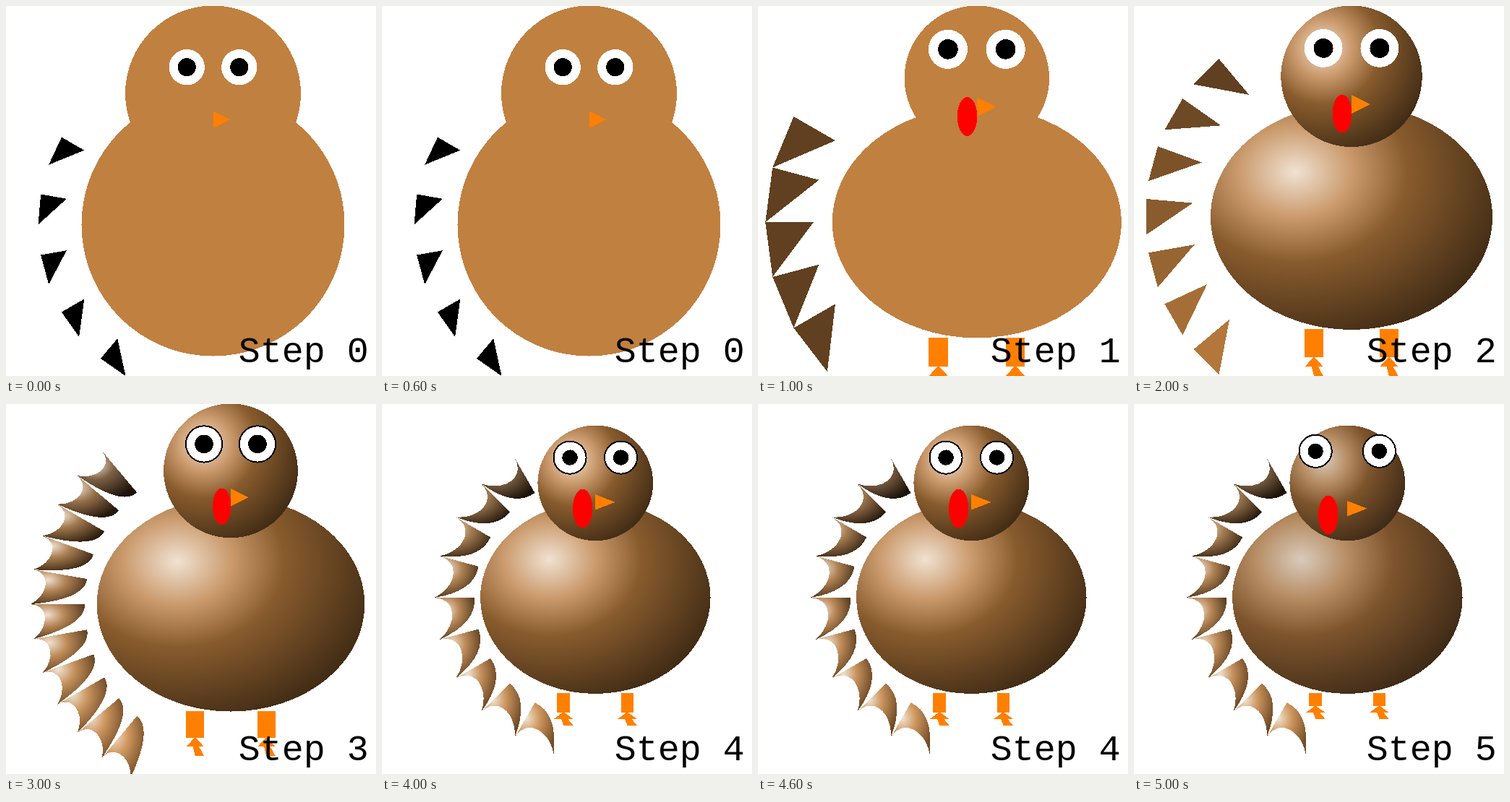
Write an HTML page that moves like this. It is 512x512 px and loops after 6000 ms.

```html
<!DOCTYPE html>
<html lang="en">
<head>
<meta charset="utf-8">
<title>Drawing a turkey step by step</title>
<style>
  html, body { margin: 0; width: 100%; height: 100%; overflow: hidden; background: #fff; }
  svg { display: block; width: 100%; height: 100%; }
  text { font: 50px "Liberation Mono", monospace; }
</style>
</head>
<body>
<svg id="stage" viewBox="0 0 512 512" shape-rendering="crispEdges"></svg>
<script>
const STEP_MS = 1000;
const TAN = [192, 128, 64];
const LIGHT = [240, 226, 210];
const ORANGE = '#ff8000';

// Proportions are in units; each step sets its unit size in pixels. Angles are in degrees.
const chick = {
  top: 0, head: 10, bodyY: 25, bodyRx: 15, bodyRy: 15,
  gap: 3, eyeY: 7, eye: 2, pupil: 1, beakY: 13, beakW: 2, beakHalf: 1,
  outer: 20, inner: 17, from: 30, to: -50, turn: 20, spread: 10, featherFill: () => [0, 0, 0]
};
const turkey = {
  ...chick, head: 7.5, bodyY: 22.5, bodyRy: 12, eyeY: 4.5, beakY: 10.5,
  wattle: 1, wattleX: -1, stance: 4, legH: 3, foot: 1,
  outer: 22, to: -30, turn: 15, spread: 15, featherFill: () => scale(TAN, 0.5)
};
const shinyTurkey = {
  ...turkey, shiny: true, dull: 0, from: 50, to: -40, spread: 10,
  featherFill: t => scale(TAN, 0.5 + 0.43 * t)
};
const curvedTurkey = {
  ...shinyTurkey, outlined: true, outer: 22.5, inner: 16.4, to: -50, turn: 10, featherFill: null
};
// Shift moves the face apart and shortens the legs, one unit each.
const plumpTurkey = shift => ({
  ...curvedTurkey, unit: 8.82, cx: 295.3, top: 30, dull: 0.12 * shift,
  head: 9, bodyY: 27, bodyRx: 18, bodyRy: 15,
  gap: 4 + shift, eyeY: 5 - shift, eye: 2.5, pupil: 1.15,
  beakY: 12 + shift, beakW: 3.1, beakHalf: 1.2,
  wattle: 1.5, wattleX: -2 - shift, stance: 5, legH: 3 - shift, foot: 1.5,
  outer: 25.3, inner: 19, from: 60, to: -60, turn: 15, spread: 15
});
const scenes = [
  { ...chick, unit: 12.1, cx: 286.5 },
  { ...turkey, unit: 13.3, cx: 302.8 },
  { ...shinyTurkey, unit: 12.97, cx: 301 },
  { ...curvedTurkey, unit: 12.32, cx: 311 },
  plumpTurkey(0),
  plumpTurkey(1)
];

const scale = (color, k) => color.map(v => v * k);
const mix = (a, b, t) => a.map((v, i) => v + (b[i] - v) * t);
const rgb = color => `rgb(${color.map(Math.round)})`;
const path = (d, fill) => `<path d="${d}" fill="${fill}"/>`;

function gradient(id, stops) {
  const marks = stops.map(([at, color]) => `<stop offset="${at}" stop-color="${rgb(color)}"/>`);
  return `<radialGradient id="${id}" cx=".3" cy=".3" r=".8">${marks.join('')}</radialGradient>`;
}

function skinGradient(dull) {
  const dim = color => mix(color, [40, 35, 30], dull);
  return gradient('skin', [
    [0, dim(LIGHT)], [0.25, dim([203, 155, 110])], [0.5, dim(scale(TAN, 0.71))], [1, dim(scale(TAN, 0.32))]
  ]);
}

// Feathers brighten from the top of the fan (t = 0) to the bottom (t = 1).
function featherGradient(id, t) {
  const middle = mix(scale(TAN, 0.5 + 0.55 * Math.sqrt(t)), LIGHT, 0.2);
  return gradient(id, [[0, LIGHT], [0.4, middle], [1, scale(TAN, 0.15 + 0.45 * t)]]);
}

function draw(s, step) {
  const px = v => v * s.unit;
  const X = v => s.cx + px(v);
  const Y = v => s.top + px(v);
  const skin = s.shiny ? 'url(#skin)' : rgb(TAN);
  const ellipse = (x, y, rx, ry, fill, extra = '') =>
    `<ellipse cx="${X(x)}" cy="${Y(y)}" rx="${px(rx) + 0.5}" ry="${px(ry) + 0.5}" fill="${fill}" ${extra}/>`;
  const polygon = (points, fill) => path('M' + points.map(([x, y]) => `${X(x)} ${Y(y)}`).join('L') + 'Z', fill);

  function feather(angle) {
    const at = (r, part) => {
      const a = (angle - s.spread * part) * Math.PI / 180;
      return `${X(-r * Math.cos(a))} ${Y(s.bodyY - r * Math.sin(a))} `;
    };
    const t = (s.from - angle) / (s.from - s.to);
    const start = `M${at(s.outer, 0)}L${at(s.inner, 0)}`;
    if (s.featherFill) return path(`${start}L${at(s.outer, 1)}Z`, rgb(s.featherFill(t)));
    const notch = s.outer * (1 - s.spread * Math.PI / 180 * 0.52);
    const vane = `${start}Q${at(s.inner, 0.8)}${at(s.outer, 1)}C${at(notch, 0.7)}${at(notch, 0)}${at(s.outer, 0)}Z`;
    return featherGradient('feather' + angle, t) + path(vane, `url(#feather${angle})`);
  }

  function leg(x) {
    const y = s.bodyY + s.bodyRy, ankle = y + s.legH, f = s.foot;
    return polygon([[x - 1, y], [x + 1, y], [x + 1, ankle], [x - 1, ankle]], ORANGE) +
      polygon([[x, ankle - 0.1], [x + f, ankle + 1], [x + 0.45 * f, ankle + 1], [x + f, ankle + 2],
        [x, ankle + 2], [x - 0.25 * f, ankle + 1], [x - f, ankle + 1]], ORANGE);
  }

  function eye(x) {
    const outline = s.outlined ? 'stroke="#000" stroke-width="2"' : '';
    return ellipse(x, s.eyeY, s.eye, s.eye, '#fff', outline) + ellipse(x, s.eyeY, s.pupil, s.pupil, '#000');
  }

  let out = s.shiny ? skinGradient(s.dull) : '';
  for (let angle = s.from; angle >= s.to; angle -= s.turn) out += feather(angle);
  if (s.legH) out += leg(-s.stance) + leg(s.stance);
  out += ellipse(0, s.bodyY, s.bodyRx, s.bodyRy, skin) + ellipse(0, s.head, s.head, s.head, skin);
  out += eye(-s.gap) + eye(s.gap);
  out += polygon([[0, s.beakY - s.beakHalf], [s.beakW, s.beakY], [0, s.beakY + s.beakHalf]], ORANGE);
  if (s.wattle) out += ellipse(s.wattleX, s.beakY + 1, s.wattle, 2 * s.wattle, '#f00');
  return out + `<text x="321.8" y="493">Step ${step}</text>`;
}

const stage = document.getElementById('stage');
let shown = -1;
function tick() {
  const step = Math.floor(performance.now() / STEP_MS) % scenes.length;
  if (step !== shown) {
    stage.innerHTML = draw(scenes[step], step);
    shown = step;
  }
  requestAnimationFrame(tick);
}
tick();
</script>
</body>
</html>
```
